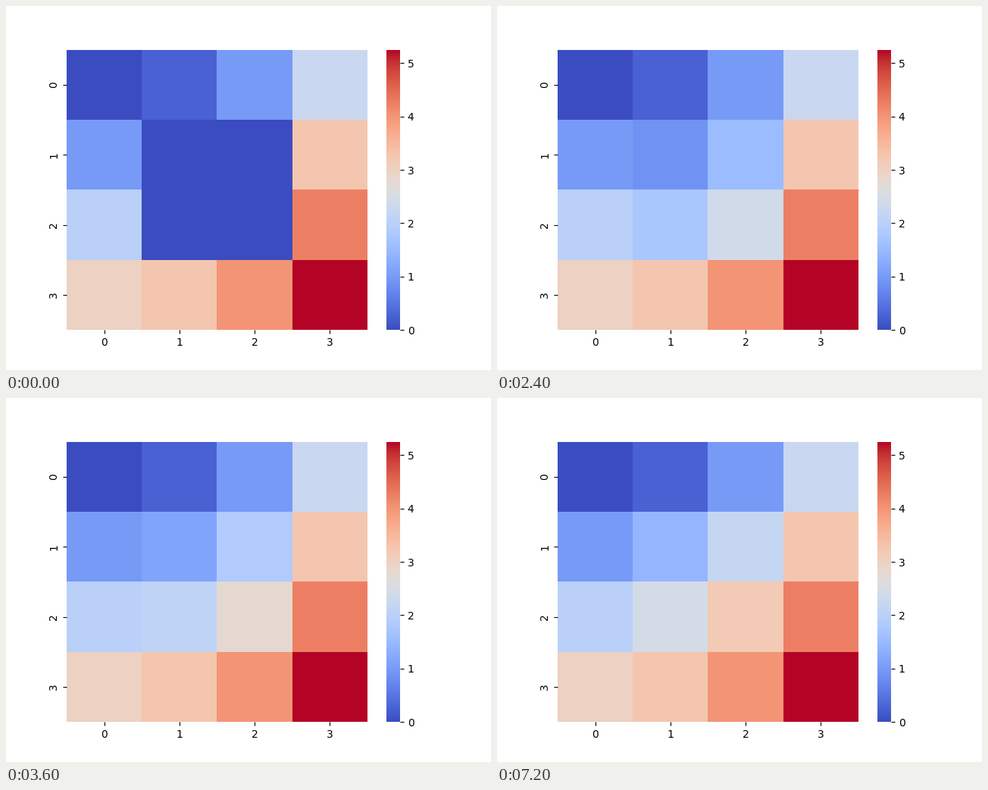
A matplotlib script that plays this animation: 640 px wide and 480 px high, repeating every 8000 ms.

```python
import numpy as np
import matplotlib.pyplot as plt
from matplotlib.animation import FuncAnimation

N = 4            # grid points per side
R = 0.4          # diffusion number of one implicit time step
TICK = 400       # ms per frame
FRAMES = 20
STEP_TICKS = 3   # frames per time step


def start_grid():
    """Boundary values x^2/4 + y around a cold interior."""
    y, x = np.mgrid[0:N, 0:N]
    grid = x**2 / 4 + y
    grid[1:-1, 1:-1] = 0
    return grid


def step_matrix():
    """Backward Euler heat equation with a fixed boundary."""
    a = np.eye(N * N)
    for i in range(1, N - 1):
        for j in range(1, N - 1):
            k = i * N + j
            a[k, k] += 4 * R
            for near in (k - 1, k + 1, k - N, k + N):
                a[k, near] -= R
    return a


def solve(steps):
    a = step_matrix()
    states = [start_grid()]
    for _ in range(steps):
        states.append(np.linalg.solve(a, states[-1].ravel()).reshape(N, N))
    return states


states = solve(6)

fig, ax = plt.subplots(figsize=(6.4, 4.8), dpi=100)
mesh = ax.pcolormesh(states[0], cmap="coolwarm", vmin=0, vmax=states[0].max())
ax.set(xlim=(0, N), ylim=(N, 0))
ax.spines[:].set_visible(False)

centers = np.arange(N) + 0.5
ax.set_xticks(centers, range(N))
ax.set_yticks(centers, range(N), rotation="vertical", va="center")

bar = fig.colorbar(mesh, ax=ax)
bar.outline.set_linewidth(0)


def draw(frame):
    step = frame // STEP_TICKS
    if step == 5:  # the fourth state is held for two steps
        step = 4
    mesh.set_array(states[step])
    return (mesh,)


anim = FuncAnimation(fig, draw, frames=FRAMES, interval=TICK,
                     init_func=lambda: draw(0), repeat=True, repeat_delay=0)
plt.show()
```
